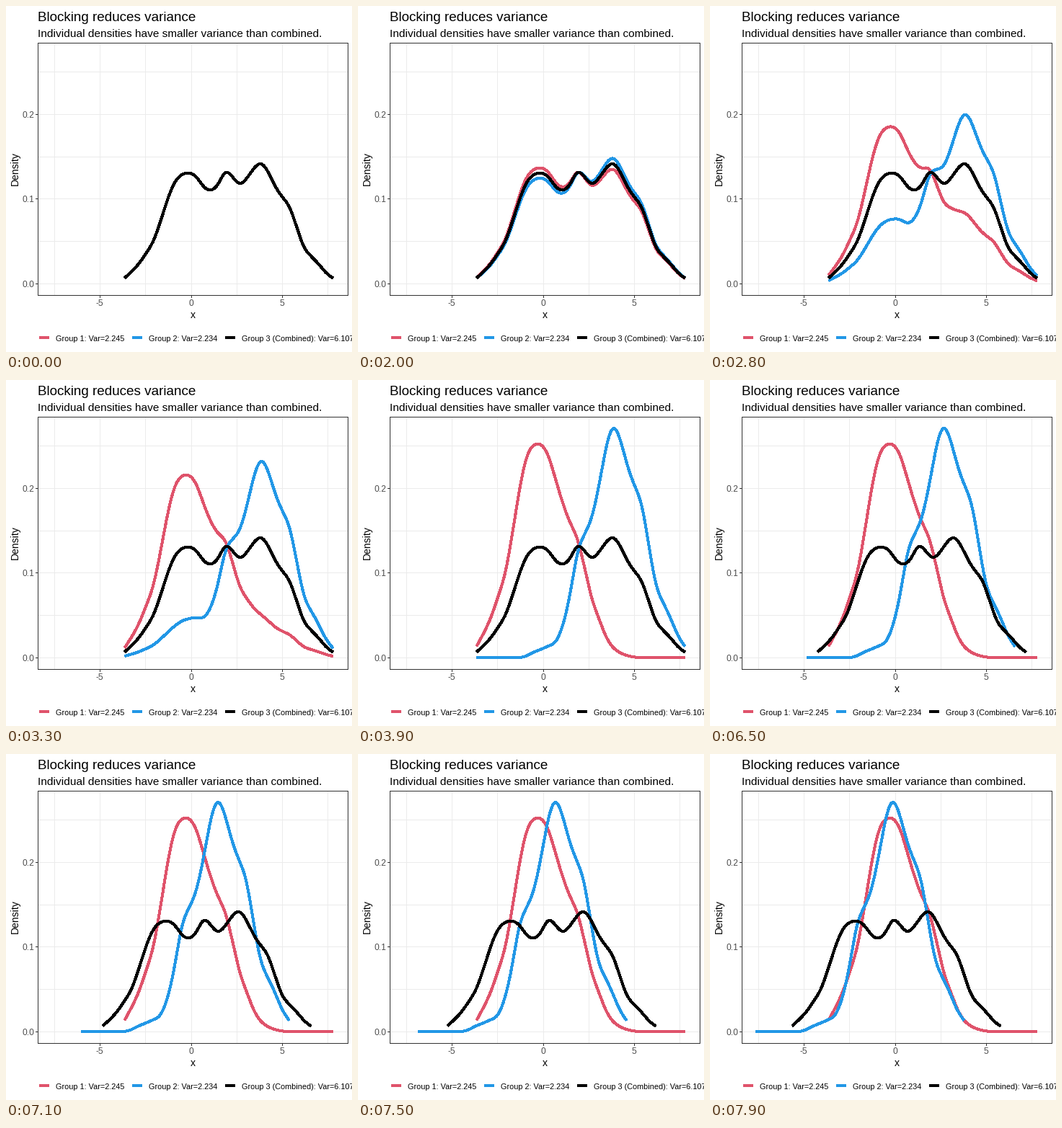
Recreate the animation shown at these times as a matplotlib script. Size 480 by 480 pixels, loop 10000 ms.

```python
import numpy as np
import matplotlib.pyplot as plt
from matplotlib.animation import FuncAnimation
from matplotlib.patches import Rectangle

SIZE, DPI = 480, 72
FRAMES, INTERVAL = 100, 100
LEFT, TOP, RIGHT, BOTTOM = 44, 51, 474, 401
RED, BLUE, BLACK = "#DF536B", "#2297E6", "#000000"
DARK, TICK_TEXT, GRID = "#333333", "#4D4D4D", "#EBEBEB"
CURVE_WIDTH, KEY_WIDTH = 3, 4
PX_PER_X, PX_PER_DENSITY = 25.3, 1175
SPLIT_START, SLIDE_START, STEPS = 19, 59, 20
SHIFT = 4.0

plt.rcParams["font.family"] = "Liberation Sans"


def to_px(x):
    return 257.1 + PX_PER_X * x


def to_py(density):
    return 385.4 - PX_PER_DENSITY * density


def spline(knots, values, x):
    """Natural cubic spline through evenly spaced knots."""
    n, h = len(knots), knots[1] - knots[0]
    system = np.eye(n)
    rhs = np.zeros(n)
    for i in range(1, n - 1):
        system[i, i - 1:i + 2] = 1, 4, 1
        rhs[i] = 6 * (values[i - 1] - 2 * values[i] + values[i + 1]) / h**2
    curv = np.linalg.solve(system, rhs)
    i = np.clip(((x - knots[0]) / h).astype(int), 0, n - 2)
    b = (x - knots[i]) / h
    a = 1 - b
    bend = (a**3 - a) * curv[i] + (b**3 - b) * curv[i + 1]
    return a * values[i] + b * values[i + 1] + bend * h**2 / 6


# Density heights in pixels at even steps along x
red_heights = [16.5, 35, 57, 85.5, 120, 175, 235.5, 279, 295, 295,
               279, 247, 214.5, 188, 165, 126, 84, 55, 30, 14.5,
               7, 3, 1, 0.3] + [0] * 6
blue_heights = [0] * 6 + [0.4, 3, 8, 12, 16.5, 23, 46, 89, 143, 171, 195, 238,
                          290, 318, 302, 267, 239, 210, 155, 102, 76, 55,
                          32, 16]

knots = np.linspace(-3.65, 7.76, 30)
xs = np.linspace(knots[0], knots[-1], 512)
red_y, blue_y = (
    np.maximum(spline(knots, np.array(h) / PX_PER_DENSITY, xs), 0)
    for h in (red_heights, blue_heights)
)
both_y = (red_y + blue_y) / 2

fig = plt.figure(figsize=(SIZE / DPI, SIZE / DPI), dpi=DPI, facecolor="white")
ax = fig.add_axes([0, 0, 1, 1])
ax.set_xlim(0, SIZE)
ax.set_ylim(SIZE, 0)
ax.axis("off")


def stroke(x, y, color, width=1, z=1):
    line, = ax.plot(x, y, color=color, lw=width, zorder=z, antialiased=False,
                    solid_capstyle="butt", solid_joinstyle="round")
    return line


def label(x, y, text, size, color=BLACK, **kwargs):
    ax.text(x, y, text, fontsize=size, color=color, va="baseline", **kwargs)


def draw_axes():
    # Whole coordinates snap to the centre of their pixel
    for x in np.arange(-7.5, 7.6, 2.5):
        px = np.floor(to_px(x))
        stroke([px, px], [TOP, BOTTOM], GRID)
        if x % 5 == 0:
            stroke([px, px], [BOTTOM, BOTTOM + 3], DARK)
            label(px, 416.5, f"{x:.0f}", 12, TICK_TEXT, ha="center")
    for k in range(6):
        py = np.floor(to_py(k * 0.05))
        stroke([LEFT, RIGHT], [py, py], GRID)
        if k % 2 == 0:
            stroke([LEFT - 3, LEFT], [py, py], DARK)
            label(39, py + 5, f"{k * 0.05:.1f}", 12, TICK_TEXT, ha="right")
    ax.add_patch(Rectangle((LEFT, TOP), RIGHT - LEFT, BOTTOM - TOP,
                           fill=False, ec=DARK, lw=1, zorder=5,
                           antialiased=False))
    label(259, 433, "x", 14, ha="center")
    label(17, 226, "Density", 14, ha="center", rotation=90,
          rotation_mode="anchor")


def draw_legend():
    entries = [(46, RED, "Group 1: Var=2.245"),
               (175, BLUE, "Group 2: Var=2.234"),
               (304, BLACK, "Group 3 (Combined): Var=6.107")]
    for x, color, text in entries:
        stroke([x, x + 14], [460, 460], color, KEY_WIDTH)
        label(x + 23, 465, text, 10.85)


label(44, 21, "Blocking reduces variance", 18.9)
label(43.5, 43, "Individual densities have smaller variance than combined.",
      15.4)
draw_axes()
draw_legend()

red_line = stroke([], [], RED, CURVE_WIDTH, 2)
blue_line = stroke([], [], BLUE, CURVE_WIDTH, 3)
both_line = stroke([], [], BLACK, CURVE_WIDTH, 4)


def progress(frame, start):
    return min(max((frame - start) / STEPS, 0), 1)


def update(frame):
    split = progress(frame, SPLIT_START)
    shift = SHIFT * progress(frame, SLIDE_START)
    red_line.set_data(to_px(xs), to_py(both_y + split * (red_y - both_y)))
    blue_line.set_data(to_px(xs - shift),
                       to_py(both_y + split * (blue_y - both_y)))
    both_line.set_data(to_px(xs - shift / 2), to_py(both_y))
    return red_line, blue_line, both_line


anim = FuncAnimation(fig, update, frames=FRAMES, interval=INTERVAL,
                     repeat=True, repeat_delay=0)
plt.show()
```
